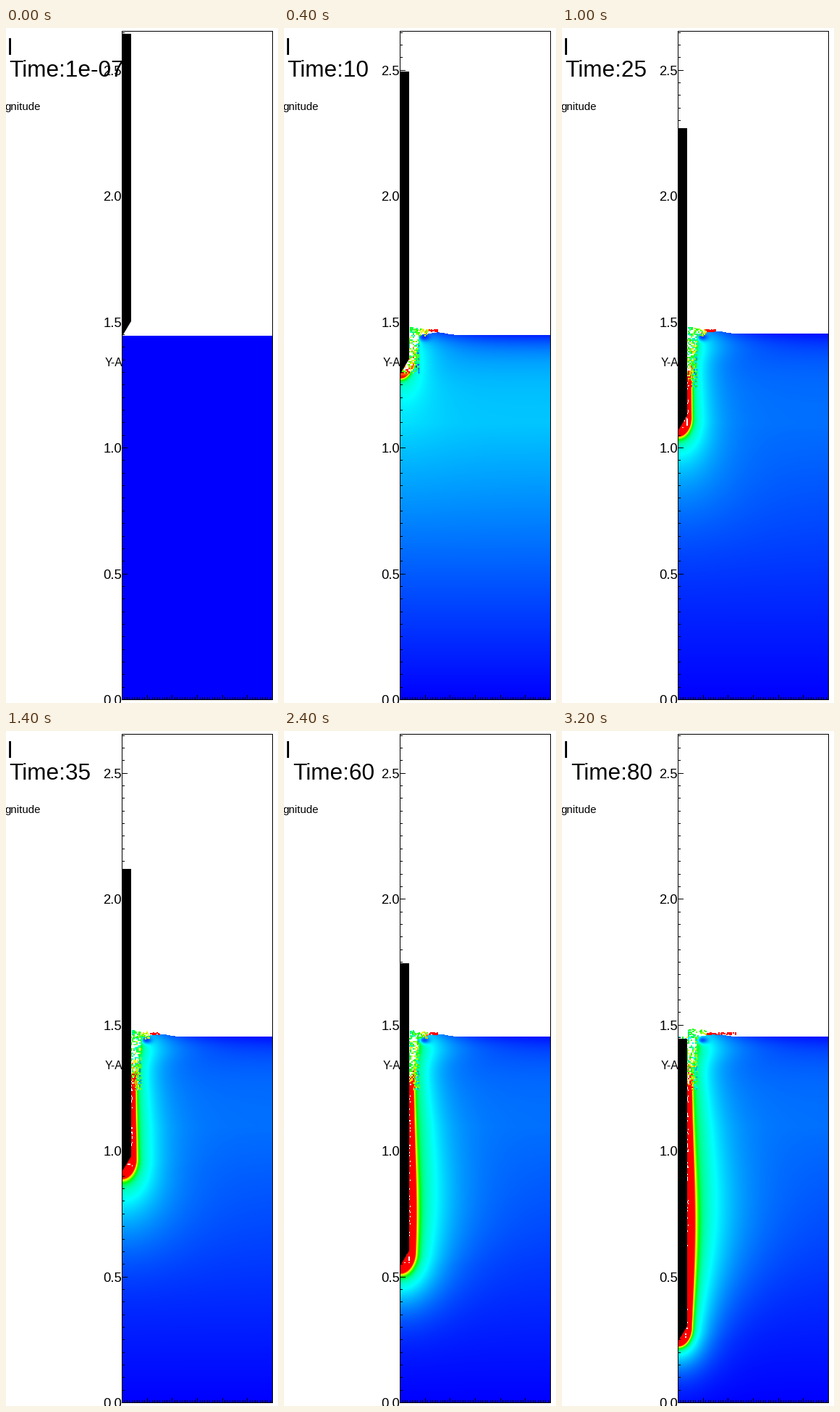
Recreate the animation shown at these times as a matplotlib script. Size 376 px wide and 930 px high, loop 3400 ms.

```python
import numpy as np
import matplotlib.pyplot as plt
from matplotlib.animation import FuncAnimation
from matplotlib.colors import hsv_to_rgb
from matplotlib.patches import Polygon

W, H, DPI = 376, 930, 100
LEFT, RIGHT, TOP, BOTTOM = 160, 368, 4, 925
UNIT = 346.9          # pixels per axis unit
PILE_EDGE = 173
FRAMES = 17

X, Y = np.meshgrid(np.arange(W) + 0.5, np.arange(H) + 0.5)

fig = plt.figure(figsize=(W / DPI, H / DPI), dpi=DPI, facecolor="white")
ax = fig.add_axes([0, 0, 1, 1])
ax.set(xlim=(0, W), ylim=(H, 0))
ax.axis("off")


def label(x, y, text, px, ha="left"):
    return ax.text(x, y, text, fontsize=px * 72 / DPI, ha=ha, va="baseline",
                   family="Liberation Sans", color="black", zorder=1)


def line(xs, ys):
    ax.plot(xs, ys, color="black", lw=0.72, antialiased=False, zorder=4)


def draw_axes():
    line([LEFT, RIGHT, RIGHT, LEFT, LEFT], [TOP, TOP, BOTTOM, BOTTOM, TOP])
    for i in range(54):
        y = BOTTOM - i * 0.05 * UNIT
        if y > TOP:
            line([LEFT, LEFT + (7 if i % 10 == 0 else 3)], [y, y])
    for i in range(1, 60):
        x = LEFT + i * 0.01 * UNIT
        line([x, x], [BOTTOM, BOTTOM - (6 if i % 10 == 0 else 3)])
    for i in range(6):
        label(160, BOTTOM - i * 0.5 * UNIT + 7, f"{i / 2:.1f}", 18.5, "right")


def bell(value, centre, width):
    return np.exp(-((value - centre) / width) ** 2)


def rainbow(v):
    """Blue to red by hue."""
    hue = (1 - np.clip(v, 0, 1)) * 2 / 3
    return hsv_to_rgb(np.stack([hue, np.ones_like(hue), np.ones_like(hue)], -1))


def background(t):
    """Slow flow, still at the floor and the surface, strongest at impact."""
    peak = 0.11 + 0.11 * np.exp(-(t / 14) ** 4)
    rise = 1 - np.exp(-np.maximum(0, Y - 420) / 25)
    return peak * rise * np.clip((BOTTOM - Y) / 380, 0, 1)


def pile_flow(t, tip):
    """Fast layer hugging the pile inside a wide, slowly forming halo."""
    below = 0.7 * np.maximum(0, Y - (tip - 17))
    distance = np.hypot(X - 161, below) - (PILE_EDGE - 161)
    age = 1 - np.exp(-np.maximum(0, tip - Y) / 100)
    spread = 0.6 + 0.65 * bell(Y, 690, 140) + 0.5 * bell(Y, 430, 25)
    q = np.maximum(0, distance) / (spread * (0.82 + 0.25 * age))
    halo = 0.45 * (1 - np.exp(-t / 15)) * np.exp(-q / 34)
    return 1.5 * bell(q, 0, 8.3) + halo


def speed_field(t, tip, noise):
    cap = 0.42 + 0.9 / (1 + np.exp((482 - Y) / 8))
    v = background(t) + np.minimum(pile_flow(t, tip), cap)
    churn = (X < 187) & (Y < 495) & (Y < tip)
    v += churn * (noise - 0.45) * 0.6
    eddy = bell(X, 194, 8) * bell(Y, 427, 5)
    return v * (1 - 0.75 * eddy) * min(1, t / 5)


def splash(rgba, rng, t):
    """Loose particles thrown above the surface."""
    late = max(0, t - 60) / 20
    for _ in range(int(95 * min(1, t / 10))):
        u = rng.random() ** 1.5
        x = 174 + (38 + 28 * late) * u
        y = 425 - (12 + 2 * late) * rng.random() ** 0.7 * (1 - 0.35 * u)
        value = 0.2 + 0.35 * rng.random() + 0.6 * u
        if x > 199:
            y, value = 416 + 3 * rng.random(), 1.0
        r, c = int(y), int(x)
        rgba[r:r + 2, c:c + 2, :3] = rainbow(np.array(value))
        rgba[r:r + 2, c:c + 2, 3] = 1


def fluid(t, tip):
    rng = np.random.default_rng(100 + t)
    grain, holes = rng.random((2, H // 2, W // 2)).repeat(2, 1).repeat(2, 2)
    surface = (422 + 2.5 * np.exp(-(t / 14) ** 4)
               - 3.5 * min(t / 10, 1) * bell(X, 213, 15))
    inside = (X > 161) & (X < RIGHT) & (Y > surface) & (Y < BOTTOM)
    loose_edge = 174.5 + 12 * bell(Y, 422, 45)
    sparsity = 0.1 + 0.5 * np.exp((420 - Y) / 60)
    inside &= ~((X < loose_edge) & (Y < tip - 3) & (holes < sparsity))
    rgba = np.dstack([rainbow(speed_field(t, tip, grain)), inside])
    splash(rgba, rng, t)
    return rgba


draw_axes()
label(2, 37, "l", 32)
label(48, 113, "gnitude", 15, "right")
label(137, 466, "Y-Axis", 15.5)
# White backing keeps text from showing inside the plot.
ax.add_patch(Polygon([(161, 4), (368, 4), (368, 925), (161, 925)],
                     facecolor="white", edgecolor="none", zorder=1.5))
time_text = label(4.5, 67, "", 31.5)
picture = ax.imshow(np.zeros((H, W, 4)), extent=(0, W, H, 0), aspect="auto",
                    interpolation="nearest", zorder=2)
pile = ax.add_patch(Polygon([(0, 0), (1, 1), (1, 0)], facecolor="black",
                            edgecolor="none", zorder=3))


def update(frame):
    t = 5 * frame
    top = 8 + 5.2 * t
    tip = top + 416
    time_text.set_text(f"Time:{t}" if t else "Time:1e-07")
    time_text.set_x(4.5 if t < 50 else 12)
    pile.set_xy([(160, top), (PILE_EDGE, top), (PILE_EDGE, top + 396),
                 (161, tip), (160, tip)])
    picture.set_data(fluid(t, tip))
    return picture, pile, time_text


anim = FuncAnimation(fig, update, frames=FRAMES, interval=200, repeat=True,
                     repeat_delay=0, blit=False)
plt.show()
```
